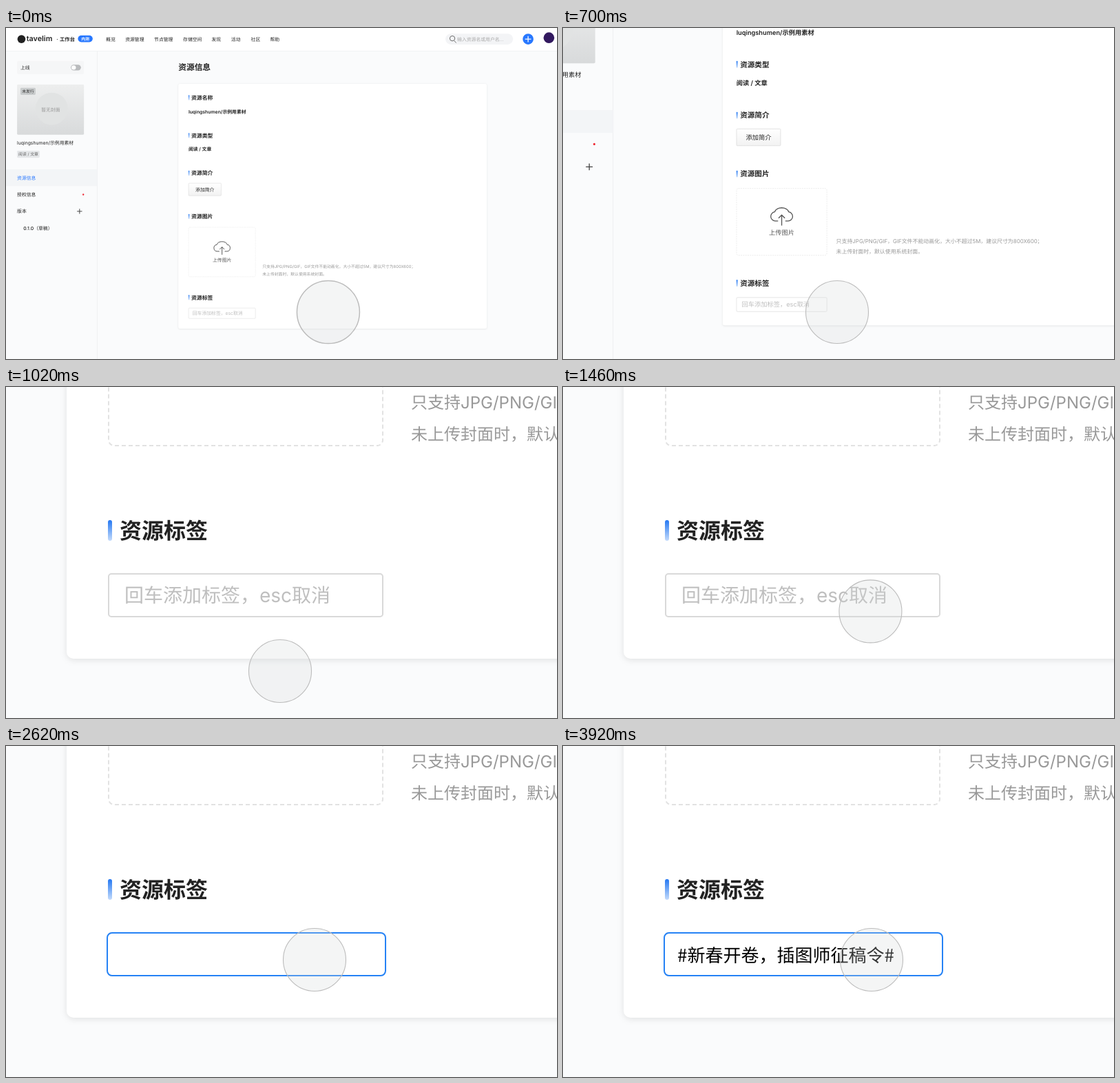
Animation of 800x480 px, one loop 4.36 s. Source, as an HTML page:

```html
<!DOCTYPE html>
<html lang="zh-CN">
<head>
<meta charset="utf-8">
<title>资源标签</title>
<style>
html, body { margin: 0; width: 100%; height: 100%; overflow: hidden; background: #fafbfc; }
svg { display: block; width: 100%; height: 100%; }
text { font-family: Inter, "Noto Sans CJK SC", "Noto Sans CJK", sans-serif; text-rendering: geometricPrecision; white-space: pre; }
.tag { font-family: "Noto Sans CJK SC", "Noto Sans CJK", sans-serif; }
.card { filter: drop-shadow(0 1px 2.5px rgba(0, 0, 0, .1)); }
</style>
</head>
<body>
<svg viewBox="0 0 800 480">
  <defs>
    <linearGradient id="bar" x2="0" y2="1"><stop stop-color="#2478f2"/><stop offset="1" stop-color="#c4dbfb"/></linearGradient>
    <linearGradient id="cover" x2="0" y2="1"><stop stop-color="#edeeee"/><stop offset="1" stop-color="#d8dadb"/></linearGradient>
    <linearGradient id="button" x2="0" y2="1"><stop stop-color="#fff"/><stop offset="1" stop-color="#f2f2f2"/></linearGradient>
  </defs>
  <rect width="800" height="480" fill="#fafbfc"/>
  <g id="page"></g>
  <circle id="cursor"/>
</svg>
<script>
const NS = 'http://www.w3.org/2000/svg';
const LOOP = 4360;
const page = document.getElementById('page');
const cursor = document.getElementById('cursor');

function set(node, attrs) {
  for (const key in attrs) node.setAttribute(key, attrs[key]);
  return node;
}
function add(tag, attrs) {
  return page.appendChild(set(document.createElementNS(NS, tag), attrs));
}
function rect(x, y, width, height, fill, more) {
  return add('rect', { x, y, width, height, fill, ...more });
}
function disc(cx, cy, r, fill) {
  return add('circle', { cx, cy, r, fill });
}
function line(d, stroke, width) {
  return add('path', { d, stroke, 'stroke-width': width, fill: 'none' });
}
// y is the visual middle of the text line
function label(str, x, y, size = 14, fill = '#222', weight = 400, anchor = 'start') {
  const node = add('text', {
    x, y: y + size * .37, fill, 'font-size': size, 'font-weight': weight, 'text-anchor': anchor
  });
  node.textContent = str;
  return node;
}
function section(str, y) {
  rect(543, y - 7.5, 3, 15, 'url(#bar)', { rx: 1.5 });
  label(str, 551.5, y, 16, '#222', 600);
}

function drawHeader() {
  rect(0, 0, 1640, 69, '#e9ebee');
  rect(0, 0, 1640, 68, '#fff');
  disc(46, 33, 12, '#222');
  label('tavelim', 61, 31, 22, '#222', 600);
  label('·', 150, 33, 15, '#222', 600);
  label('工作台', 160, 33, 15, '#222', 600);
  rect(214, 22, 44, 20, '#2878ff', { rx: 10 });
  label('内测', 236, 32, 12, '#fff', 600, 'middle');
  const nav = { 概览: 298, 资源管理: 355, 节点管理: 441, 存储空间: 527, 发现: 612, 活动: 670, 社区: 729, 帮助: 786 };
  for (const name in nav) label(name, nav[name], 33, 14, '#222', 500);
  rect(1308, 17, 201, 32, '#f3f4f6', { rx: 16 });
  line('M1334 38l6 6M1336 31a7.5 7.5 0 1 1-15 0a7.5 7.5 0 0 1 15 0', '#666', 2);
  label('输入资源名或用户名...', 1343, 33, 14, '#aaa');
  disc(1554, 33, 16, '#2878ff');
  line('M1545 33h18M1554 24v18', '#fff', 2.6);
  disc(1616, 29, 16, '#32195f');
}

function drawSidebar() {
  rect(271, 69, 1, 915, '#e6e8eb');
  rect(33, 98, 199, 39, '#f5f6f7', { rx: 4 });
  label('上线', 43, 118, 14, '#222', 500);
  rect(193, 109, 30, 17, '#b9bbbd', { rx: 8.5 });
  disc(201.5, 117.5, 6.5, '#fff');
  rect(33, 168, 199, 149, 'url(#cover)', { rx: 3 });
  disc(136, 240, 48, '#e1e3e3');
  rect(43, 178, 45, 21, '#c9cccd', { rx: 3 });
  label('未发行', 65.5, 188.5, 12, '#333', 500, 'middle');
  label('暂无封面', 133, 242, 14, '#999', 400, 'middle');
  label('luqingshumen/示例用素材', 33, 342);
  rect(33, 365, 67, 21, '#e5e7e9', { rx: 3 });
  label('阅读 / 文章', 66.5, 375.5, 12, '#666', 400, 'middle');
  rect(0, 420, 271, 50, '#f3f5f7');
  label('资源信息', 33, 445, 14, '#2878ff', 500);
  label('授权信息', 33, 495, 14, '#222', 500);
  disc(230, 495, 2.4, '#ee2a35');
  label('版本', 33, 545, 14, '#222', 500);
  line('M211.5 545h15M219 537.5v15', '#444', 2);
  label('0.1.0（草稿）', 52, 595, 14, '#222', 500);
}

function drawCard() {
  label('资源信息', 513, 117, 24, '#222', 600);
  rect(513, 166, 918, 728, '#fff', { rx: 5, class: 'card' });
  section('资源名称', 207);
  label('luqingshumen/示例用素材', 543, 249, 14, '#222', 600);
  section('资源类型', 319.5);
  label('阅读 / 文章', 543, 360, 14, '#222', 600);
  section('资源简介', 431.5);
  rect(543.5, 461.5, 97, 37, 'url(#button)', { rx: 2, stroke: '#d4d4d4' });
  label('添加简介', 592, 480.5, 14, '#222', 500, 'middle');
  section('资源图片', 560.5);
  rect(543.5, 592.5, 199, 147, 'none', { rx: 4, stroke: '#e2e2e2', 'stroke-dasharray': '3 2' });
  line('M635 664h-6a10 10 0 0 1-1.5-19.9a16 12 0 0 1 31 0a10 10 0 0 1-1.5 19.9h-6M643 674v-23m-7 7l7-7l7 7', '#555', 2);
  label('上传图片', 643, 689.5, 14, '#555', 400, 'middle');
  label('只支持JPG/PNG/GIF，GIF文件不能动画化，大小不超过5M，建议尺寸为800X600；', 763, 708, 12, '#999');
  label('未上传封面时，默认使用系统封面。', 763, 731, 12, '#999');
  section('资源标签', 801);
  rect(543.5, 832.5, 199, 31, '#fff', { rx: 2, stroke: '#d9d9d9' });
  label('回车添加标签，esc取消', 555, 848, 14, '#bfbfbf');
}

drawHeader();
drawSidebar();
drawCard();
const focusBox = rect(542.5, 832.5, 202, 31, '#fff', { rx: 3.5, stroke: '#2582f5' });
const tag = set(label('#新春开卷，插图师征稿令#', 552, 848.5, 13, '#000'), { class: 'tag' });

const clamp = v => Math.min(1, Math.max(0, v));
const mix = (a, b, p) => a + (b - a) * p;

function bezier(x1, y1, x2, y2) {
  const at = (a, b, u) => 3 * a * u * (1 - u) ** 2 + 3 * b * u * u * (1 - u) + u ** 3;
  return v => {
    let lo = 0, hi = 1;
    for (let i = 0; i < 24; i++) {
      const mid = (lo + hi) / 2;
      if (at(x1, x2, mid) < v) lo = mid; else hi = mid;
    }
    return at(y1, y2, (lo + hi) / 2);
  };
}
const ease = bezier(.25, .1, .25, 1);
const swing = bezier(.4, 0, .2, 1);

function span(t, start, length, curve = ease) {
  const v = clamp((t - start) / length);
  return v === 0 || v === 1 ? v : curve(v);
}

function draw(t) {
  const zoom = span(t, 661, 359);
  const scale = mix(1 / 2.05, 2, zoom);
  page.setAttribute('transform', `matrix(${scale} 0 0 ${scale} ${-938 * zoom} ${-1394 * zoom})`);

  const focus = span(t, 2340, 290);
  focusBox.setAttribute('opacity', focus);
  tag.setAttribute('opacity', t < 3260 ? 0 : mix(.08, 1, clamp((t - 3320) / 600)));

  const press = t < 2200 ? 0 : 1 - focus;
  set(cursor, {
    cx: mix(468, 398, span(t, 0, 360)) + 50 * span(t, 1120, 440),
    cy: mix(412, 310, span(t, 1120, 600, swing)),
    r: mix(45.5, 43.5, press),
    fill: `rgba(211,213,215,${mix(.25, .55, press)})`,
    stroke: press > .5 ? '#a2a2a2' : '#bcbcbc',
    'stroke-width': t < 540 ? 1.5 : 1.1
  });
}

const begin = performance.now();
function tick() {
  draw((performance.now() - begin) % LOOP);
  requestAnimationFrame(tick);
}
tick();
</script>
</body>
</html>
```
